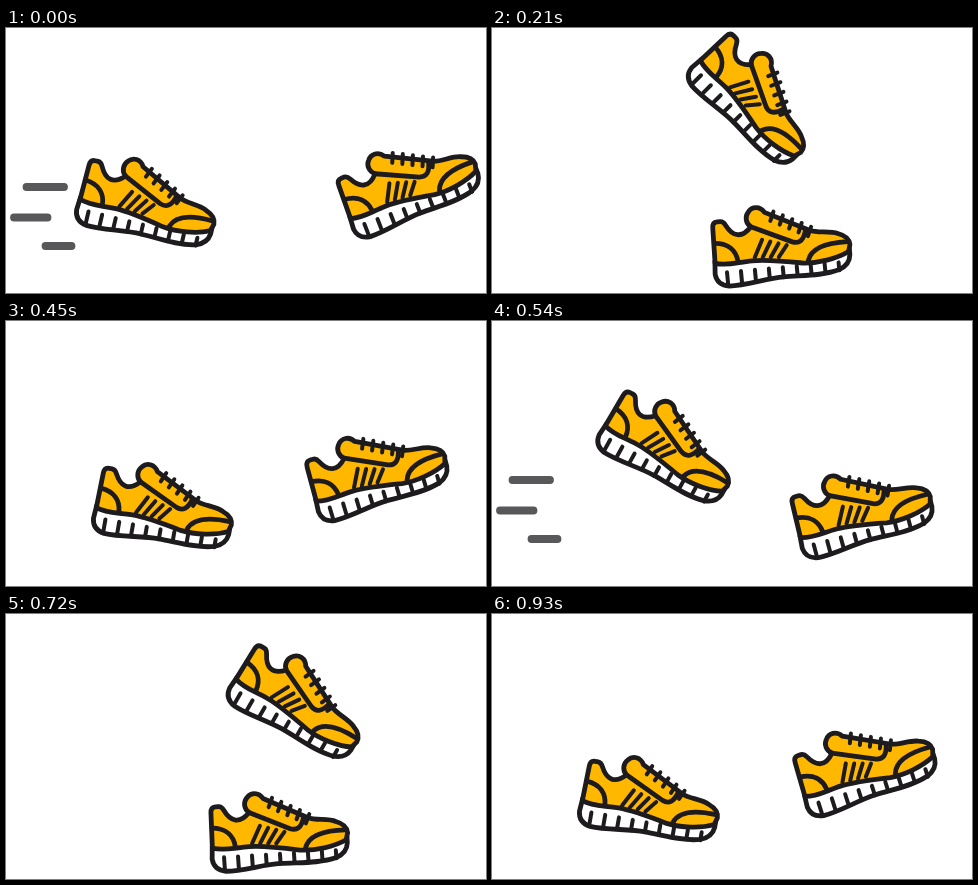
An HTML page for the animation above (0.96 s loop, 480 by 265 pixels).

```html
<!DOCTYPE html>
<html lang="en">
<head>
<meta charset="utf-8">
<title>Running shoes</title>
<style>
  html, body { margin: 0; width: 100%; height: 100%; overflow: hidden; background: #fff; }
  svg { display: block; width: 100vw; height: 100vh; }
  .shoe { fill: none; stroke: #1d1b1d; stroke-width: 4.8; stroke-linecap: round; stroke-linejoin: round; }
  .thin { stroke-width: 4; }
  #dash { fill: none; stroke: #58585a; stroke-width: 7.8; stroke-linecap: round; }
</style>
</head>
<body>
<svg viewBox="0 0 480 265">
  <defs>
    <g id="shoe" class="shoe">
      <path fill="#fff" d="M-67,12 L-68,25 Q-67,36 -55,38 C-38,39 -18,34 0,34 C18,34 38,37 56,32 Q67,28 68,18 V12 Z"/>
      <path fill="#ffb700" d="M-67,14 L-66,-21 Q-66,-27 -61,-27 H-58 Q-55,-27 -53,-23
        C-47,-11 -38,-8 -28,-19 C-33,-23 -33,-30 -29,-34 C-25,-39 -17,-39 -13,-32
        L30,-10 C38,-6 50,-8 58,-4 Q69,0 69,8 L67,15
        C55,21 35,24 20,22 C0,18 -15,15 -30,15 C-45,15 -55,18 -67,14 Z"/>
      <path d="M-66,-6 C-52,-5 -45,3 -44,14 M26,20 C30,8 45,4 67,5"/>
      <path d="M-28,-19 L12,0 Q22,4 26,-10"/>
      <path class="thin" id="stripes"/>
      <path class="thin" id="laces"/>
      <path class="thin" id="treads"/>
    </g>
  </defs>
  <path id="dash" d="M20.5,159 H58 M8,189.5 H41.5 M39.5,218 H65.5"/>
  <use href="#shoe" id="left"/>
  <use href="#shoe" id="right"/>
</svg>
<script>
const STEP = 480, TICK = 30;
const el = id => document.getElementById(id);

function strokes(id, count, line) {
  el(id).setAttribute('d', Array.from({ length: count }, (_, i) => line(i)).join(' '));
}
strokes('stripes', 4, i => `M${-18 + 8 * i},${-5 + 2.6 * i} l-9,${17 - 2 * i}`);
strokes('laces', 5, i => `M${-8 + 9 * i},${-23 + 4.7 * i} l4,-9`);
strokes('treads', 9, i => `M${-56 + 14 * i},${36 - 0.4 * i} v${0.5 * i - 12}`);

// A pose is [x, y, angle]. On the ground the shoe slides back at even speed.
function ground(p) {
  const q = p - 0.5;
  return [
    402 - 259.5 * p,
    215.5 - 2 * q - 152 * q ** 2 + 86 * q ** 3 - 230 * q ** 4,
    -4 + 23 * q + 45 * q ** 3
  ];
}

// In the air it follows a smooth curve: lift, peak, swing, reach
const air = [
  [-0.06, ...ground(0.94)],
  [0, ...ground(1)],
  [0.25, 222, 81, 43],
  [0.39, 266, 70, 45],
  [0.5, 295, 86.5, 30],
  [0.94, 373, 149, -18],
  [1, ...ground(0)],
  [1.06, ...ground(0.06)]
];

function swing(p) {
  let i = 1;
  while (air[i + 1][0] <= p) i++;
  const [a, b, c, d] = air.slice(i - 1, i + 3);
  const h = c[0] - b[0], u = (p - b[0]) / h, v = 1 - u;
  return [1, 2, 3].map(k => {
    const m0 = (c[k] - a[k]) / (c[0] - a[0]), m1 = (d[k] - b[k]) / (d[0] - b[0]);
    return b[k] * v * v * (1 + 2 * u) + c[k] * u * u * (3 - 2 * u)
      + h * u * v * (m0 * v - m1 * u);
  });
}

function place(id, t, lag) {
  const p = (t / STEP) % 2;
  const pose = p < 1 ? swing(p - lag * Math.sin(Math.PI * p)) : ground(p - 1);
  const [x, y, angle] = pose.map(n => n.toFixed(2));
  el(id).setAttribute('transform', `translate(${x} ${y}) rotate(${angle})`);
}

function draw(ms) {
  const t = Math.floor(ms / TICK) * TICK;
  place('left', t, 0.05);
  place('right', t + STEP, 0);
  el('dash').style.display = t % STEP < 90 ? '' : 'none';
}

let start;
function frame(now) {
  start ??= now;
  draw(Math.max(0, now - start));
  requestAnimationFrame(frame);
}
draw(0);
requestAnimationFrame(frame);
</script>
</body>
</html>
```
